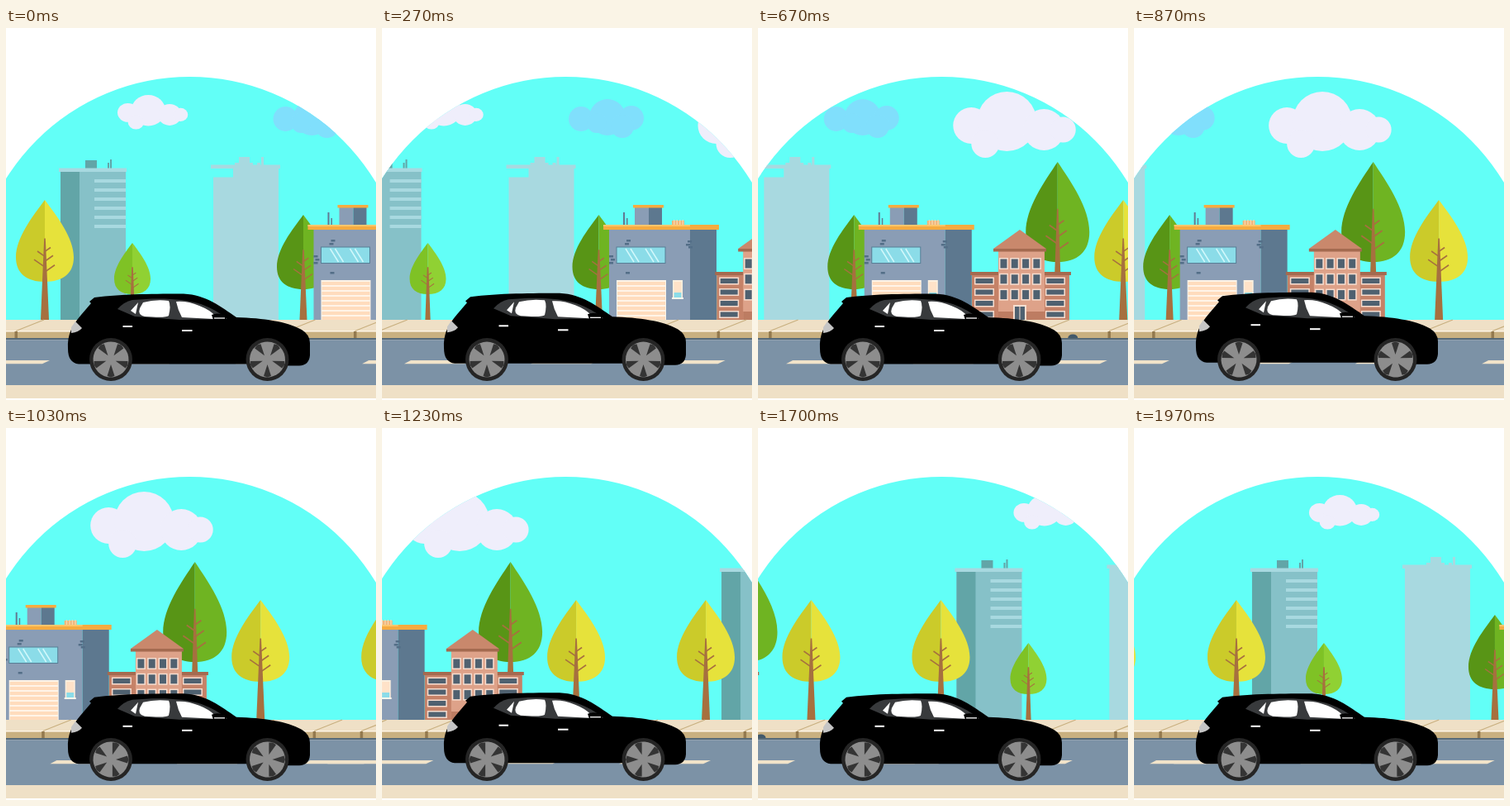
An HTML page with a canvas that plays this animation: 448x450 px, repeating every 2010 ms.

```html
<!DOCTYPE html>
<html lang="en">
<head>
<meta charset="utf-8">
<title>City drive</title>
<style>
html, body { margin: 0; width: 100%; height: 100%; overflow: hidden; background: #fff; }
canvas { display: block; }
</style>
</head>
<body>
<canvas id="stage" width="448" height="450"></canvas>
<script>
const ctx = document.getElementById('stage').getContext('2d');
const LOOP = 2010, TILE = 796, SPEED = 12.187;

function rect(color, x, y, w, h) {
  ctx.fillStyle = color;
  ctx.fillRect(x, y, w, h);
}
function poly(color, ...p) {
  ctx.fillStyle = color;
  ctx.beginPath();
  for (let i = 0; i < p.length; i += 2) ctx.lineTo(p[i], p[i + 1]);
  ctx.fill();
}
function disc(color, x, y, r) {
  ctx.fillStyle = color;
  ctx.beginPath();
  ctx.arc(x, y, r, 0, 7);
  ctx.fill();
}
function line(color, width, ...p) {
  ctx.strokeStyle = color;
  ctx.lineWidth = width;
  ctx.beginPath();
  for (let i = 0; i < p.length; i += 2) ctx.lineTo(p[i], p[i + 1]);
  ctx.stroke();
}
function shape(color, d) {
  ctx.fillStyle = color;
  ctx.fill(new Path2D(d));
}

function tree(x, top, half, bottom, left, right, base = 353) {
  const h = bottom - top, bark = '#a6703f', s = half / 35;
  for (const [side, color] of [[-1, left], [1, right]]) {
    const w = half * side;
    ctx.fillStyle = color;
    ctx.beginPath();
    ctx.moveTo(x, top);
    ctx.bezierCurveTo(x + w * .42, top + h * .2, x + w, top + h * .46, x + w, top + h * .7);
    ctx.bezierCurveTo(x + w, top + h * .9, x + w * .62, bottom, x, bottom);
    ctx.fill();
  }
  poly(bark, x - .8, top + h * .47, x + .8, top + h * .47, x + 5 * s, base, x - 5 * s, base);
  for (const [side, at, len] of [[1, .63, 7], [-1, .69, 9], [1, .75, 10], [-1, .82, 13], [1, .88, 12]])
    line(bark, 1.6 * s, x, top + h * at, x + side * len * s, top + h * at - len * .7 * s);
}

function cloud(color, x, y, sx, sy, puffs) {
  ctx.save();
  ctx.translate(x, y);
  ctx.scale(sx, sy);
  for (const [px, py, r] of puffs) disc(color, px, py, r);
  ctx.restore();
}
const whitePuffs = [[22, 41, 22], [65, 36, 36], [110, 46, 25], [133, 46, 15.5], [39, 63, 17]];
const bluePuffs = [[15, 24, 15], [47, 22, 22], [76, 23, 15], [65, 33, 14], [34, 29, 12]];

function tealTower() {
  const dark = '#62a5a7', pale = '#a8d9e0';
  rect(dark, 96, 160, 14, 10);
  rect(dark, 123, 163, 2, 7);
  rect(dark, 126, 159, 2, 11);
  rect('#86c1c8', 66, 172, 79, 181);
  rect(dark, 66, 174, 23, 179);
  rect(pale, 64, 169.5, 82, 4.5);
  for (let i = 0; i < 6; i++) rect(pale, 107, 183 + i * 11, 38, 4);
}

function paleTower(notched) {
  const c = '#a8d9e0';
  rect(c, 251, 166, 79, 187);
  rect(c, 248, 165.5, 84, 4.5);
  rect(c, 282, 156, 13, 10);
  rect(c, 277, 163, 22, 3);
  rect(c, 304, 163, 4, 3);
  rect(c, 309, 156, 3, 10);
  if (notched) rect('#62fff7', 248, 170, 27, 10.5);
}

function shop() {
  const front = '#8a9db5', side = '#5d788f', gold = '#f6ab40';
  ctx.save();
  ctx.translate(97.5, 0);
  rect('#617a92', 292, 223, 2, 16);
  rect('#617a92', 296, 230, 1.5, 9);
  rect(front, 306, 217, 17, 22);
  rect(side, 323, 217, 16, 22);
  rect(gold, 304, 214, 37, 3.5);
  rect('#efb478', 351, 233, 15, 5);
  for (let i = 0; i < 4; i++) rect('#f6d5aa', 353 + i * 3.5, 232, 1.5, 6);
  rect(front, 275, 243, 98, 110);
  rect(side, 373, 243, 32, 110);
  rect(gold, 268, 238, 140, 6);
  rect('#ffc66c', 268, 238, 105, 2);
  for (const [x, y] of [[296, 256], [294, 260], [370, 257], [368, 261], [371, 264], [275, 275], [277, 279], [275, 283], [295, 295]])
    rect('#536e87', x, y, 5, 2.5);
  rect('#567f96', 283.5, 264.5, 60, 20.5);
  rect('#8bdce8', 284.5, 265.5, 58, 18.5);
  for (const x of [300, 306, 324, 330]) line('#d1f8fb', 1.5, x - 5, 267, x + 5, 283);
  rect('#fff4e8', 284, 305, 60, 48);
  for (let i = 0; i < 8; i++) rect('#ffdcbd', 285, 307 + i * 6, 58, 4);
  rect('#fff0df', 352, 305, 12, 22);
  rect('#ffe2c8', 353.5, 307, 9, 13);
  rect('#8bdce8', 353.5, 320, 9, 6);
  rect('#fff7ed', 351, 326, 14, 2);
  ctx.restore();
}

function pane(x, y, w, h) {
  rect('#f7ded0', x, y, w, h);
  rect('#4f6170', x + 1.5, y + 1.5, w - 3, h - 3);
}

function brickHouse() {
  const wing = '#c58268', trim = '#a46a50';
  ctx.save();
  ctx.translate(243.7, 0);
  rect(wing, 259, 297, 118, 56);
  rect(trim, 257, 295, 122, 4);
  rect('#dea289', 291, 268, 56, 85);
  rect('#bd7c62', 291, 343, 56, 10);
  poly('#c9886c', 285, 267, 317, 244, 349, 267);
  rect(trim, 285, 267, 64, 3.5);
  for (let row = 0; row < 4; row++) {
    const y = 301.5 + row * 13.5;
    pane(262, y, 24, 9);
    pane(348, y, 24, 9);
  }
  for (let row = 0; row < 3; row++)
    for (let col = 0; col < 4; col++) pane(292 + col * 13.3, 278 + row * 18.8, 11, 14);
  rect('#f7ded0', 309, 335, 16, 18);
  rect('#4f6170', 311, 337, 5.5, 16);
  rect('#4f6170', 317.5, 337, 5.5, 16);
  ctx.restore();
}

function scenery(first) {
  const white = '#efeefb', yellow = ['#cbcb2a', '#e6e23b'], green = ['#589516', '#6fb422'];
  cloud(white, 135, 81, .574, .52, whitePuffs);
  cloud('#80dffc', 323.5, 86, 1, 1, bluePuffs);
  cloud(white, 480, 77, 1, 1, whitePuffs);
  tealTower();
  paleTower(first);
  tree(47, 208, 35, 307, ...yellow);
  tree(153, 260, 22, 322, '#7fc225', '#90d133');
  tree(360, 226, 32, 316, ...green, 355);
  shop();
  tree(606.5, 162, 38.5, 283, ...green);
  brickHouse();
  tree(686, 208, 35, 307, ...yellow);
}

function ground() {
  rect('#efe0c6', 0, 353, 448, 13);
  rect('#fff5e4', 0, 366, 448, 1.5);
  rect('#c9b080', 0, 367.5, 448, 7.5);
  rect('#566a78', 0, 375, 448, 2.5);
  rect('#7c92a6', 0, 377.5, 448, 55);
  rect('#efe0c6', 0, 432, 448, 16);
}

function marks() {
  for (let i = 0; i < 10; i++) {
    const x = 12 + i * 82.1;
    line('#c9b080', 1.3, x, 366.5, x + 34, 353);
    rect('#93794e', x - 1.5, 367, 3.5, 8);
  }
  ctx.fillStyle = '#42596a';
  ctx.beginPath();
  ctx.ellipse(625, 375, 6, 4.5, 0, Math.PI, 0);
  ctx.fill();
  for (let i = 0; i < 6; i++) {
    const x = -29 + i * 153.4;
    poly('#f1e3c9', x, 406.3, x + 8, 402, x + 82, 402, x + 73, 406.3);
  }
}

function wheel(x, angle) {
  ctx.save();
  ctx.translate(x, 401);
  disc('#252525', 0, 0, 26);
  ctx.rotate(angle);
  disc('#8d8d8d', 0, 0, 21.5);
  for (let i = 0; i < 5; i++) {
    ctx.rotate(Math.PI * .4);
    poly('#343434', 0, -6, 4.5, -20, 0, -21.5, -4.5, -20);
  }
  ctx.restore();
}

function car(lift, angle) {
  ctx.save();
  ctx.translate(0, -lift);
  shape('#000', 'M101 331L107 326C140 321.5 185 321.5 215 321.5C243 323 260 337 279 350C312 351 340 355 358 365Q368 371 368 381V396Q367 408 355 408.5H340L300 406.5H88Q75 405 75 388C74 371 80 360 91 347L103 333Z');
  shape('#383a3c', 'M135 340Q143 331 153 329C184 326 215 327 236 334Q255 341 268 352L210 353L156 349Z');
  shape('#fff', 'M151 342L160 332L157 346Z');
  shape('#fff', 'M166 332Q181 328 197 330Q200 336 197 348Q194 351 168 349Q159 347 162 339Z');
  shape('#fff', 'M206 331Q220 330 234 336Q247 341 253 348L251 352L213 350Q208 341 206 331Z');
  shape('#000', 'M249 347Q255 344 265 347L267 354L252 356Z');
  line('#fff', 1.3, 252, 351, 265, 351);
  shape('#c5c5c5', 'M79 362L84 355L92 363Q88 368 79 369Z');
  line('#fff', 2, 141.5, 361, 153, 361);
  line('#fff', 2, 213, 366, 225.5, 366);
  ctx.restore();
  wheel(127, angle);
  wheel(316.5, angle);
}

// Draws the given part once per visible copy of the street.
function tiled(shift, part) {
  for (let i = 0; i < 2; i++) {
    ctx.save();
    ctx.translate(i * TILE - shift, 0);
    part(i === 0);
    ctx.restore();
  }
}

function draw(step) {
  const shift = step * SPEED;
  rect('#fff', 0, 0, 448, 450);
  ctx.save();
  ctx.beginPath();
  ctx.arc(222.5, 321.5, 262.5, 0, 7);
  ctx.clip();
  rect('#62fff7', 0, 0, 448, 355);
  tiled(shift, scenery);
  ctx.restore();
  ground();
  tiled(shift, marks);
  // The body bobs every 10 steps; the wheels turn once in 20.
  car(1 - Math.cos(step * Math.PI / 5), (step + 2) * Math.PI / 10);
}

// 30 steps per second on a 10 ms clock
function tick() {
  const t = performance.now() % LOOP;
  draw(Math.min(59, Math.floor((Math.floor(t / 10) + .5) * .3)));
  requestAnimationFrame(tick);
}
tick();
</script>
</body>
</html>
```
